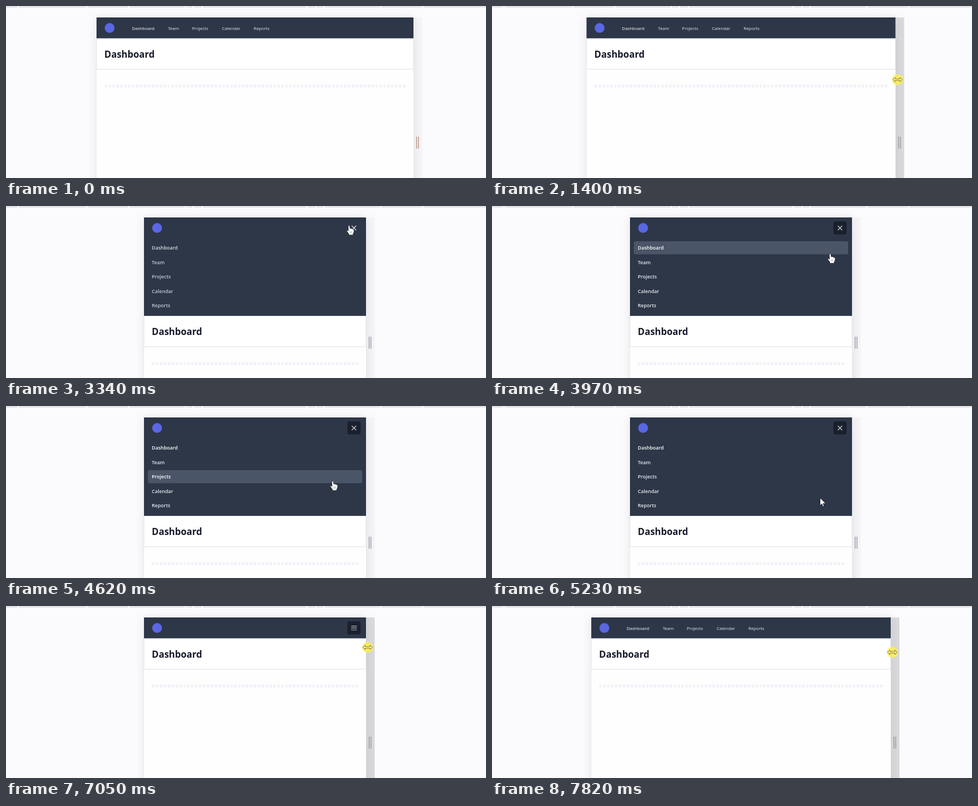
An HTML page with a canvas that plays this animation: 880 by 316 pixels, repeating every 8000 ms.

```html
<!DOCTYPE html>
<html lang="en">
<head>
<meta charset="utf-8">
<title>Responsive dashboard</title>
<style>
  html, body { margin: 0; width: 100%; height: 100%; overflow: hidden; background: #fbfbfd; }
  canvas { display: block; width: 880px; height: 316px; }
</style>
</head>
<body>
<canvas id="stage"></canvas>
<script>
const W = 880, H = 316, LOOP = 8000;
const canvas = document.getElementById('stage');
const dpr = window.devicePixelRatio || 1;
canvas.width = W * dpr;
canvas.height = H * dpr;
const c = canvas.getContext('2d');
c.scale(dpr, dpr);

const FONT = '"Open Sans", "Noto Sans", sans-serif';
const ITEMS = [['Dashboard', 65], ['Team', 131], ['Projects', 175], ['Calendar', 230], ['Reports', 288]];
const TOP_GAPS = [22, 148, 225, 329, 343, 360, 552, 568, 583, 687, 764];
const NAV_TOP = 21, NAV_H = 38.4, MENU_H = 142.5, STRIP = 16;
const ROW_TOP = 64.5, ROW_STEP = 26.5, ROW_H = 24;
const BREAKPOINT = 461;

const linear = p => p;
const smooth = p => p * p * (3 - 2 * p);
const easeOut = p => 1 - (1 - p) * (1 - p);
const lerp = (a, b, p) => a + (b - a) * p;
const within = (v, a, b) => v >= a && v < b;

// Pointer legs: start, end, number of steps, destination, easing
const LEGS = [
  [70, 840, 11, [751, 135], easeOut],
  [1310, 2110, 11, [667, 139], smooth],
  [2160, 2160, 1, [665, 139], linear],
  [2560, 2960, 6, [629, 36], smooth],
  [3570, 3970, 6, [620, 88], smooth],
  [4300, 4620, 5, [599, 138], linear],
  [4690, 5080, 6, [596, 187], easeOut],
  [5150, 5790, 9, [639, 44], smooth],
  [6570, 6880, 5, [663, 76], smooth],
  [7200, 7820, 9, [734, 85], linear]
];

// Progress in even jumps; the first jump happens at the start time
function stepped(t, a, b, n) {
  if (t < a) return 0;
  if (n === 1 || t >= b) return 1;
  return Math.min(n, Math.floor((t - a) / ((b - a) / (n - 1)) + 0.001) + 1) / n;
}

function pointerAt(t) {
  let x = 868, y = 128;
  for (const [a, b, n, to, ease] of LEGS) {
    if (t < a) break;
    const p = ease(stepped(t, a, b, n));
    x = lerp(x, to[0], p);
    y = lerp(y, to[1], p);
  }
  return { x, y };
}

function panelLeft(t) {
  if (t < 2160) return lerp(166, 250, smooth(stepped(t, 1310, 2110, 11)));
  return lerp(253, 182, stepped(t, 7200, 7820, 9));
}

function menuAlpha(t) {
  if (!within(t, 3260, 6090)) return 0;
  return t < 3340 ? 0.65 : t < 3420 ? 0.82 : 1;
}

function rect(x, y, w, h, color) {
  c.fillStyle = color;
  c.fillRect(x, y, w, h);
}

function roundRect(x, y, w, h, r, color) {
  c.beginPath();
  c.roundRect(x, y, w, h, r);
  c.fillStyle = color;
  c.fill();
}

function text(str, x, y, size, weight, color) {
  c.font = `${weight} ${size}px ${FONT}`;
  c.fillStyle = color;
  c.fillText(str, x, y);
}

function disc(x, y, r, color) {
  c.beginPath();
  c.arc(x, y, r, 0, Math.PI * 2);
  c.fillStyle = color;
  c.fill();
}

function strokeLines(lines, color, width) {
  c.beginPath();
  for (const [x1, y1, x2, y2] of lines) {
    c.moveTo(x1, y1);
    c.lineTo(x2, y2);
  }
  c.strokeStyle = color;
  c.lineWidth = width;
  c.lineCap = 'round';
  c.stroke();
}

function shape(points, fill, stroke) {
  c.beginPath();
  points.forEach(([x, y]) => c.lineTo(x, y));
  c.closePath();
  c.fillStyle = fill;
  c.fill();
  c.strokeStyle = stroke;
  c.lineWidth = 1;
  c.lineJoin = 'round';
  c.stroke();
}

function drawBackdrop() {
  rect(0, 0, W, H, '#fbfbfd');
  rect(0, 0, W, 3, '#e4e4e7');
  TOP_GAPS.forEach(x => rect(x - 1, 0, 2, 3, '#ffffff'));
}

function drawStrip(right, dark, t) {
  rect(right, NAV_TOP, STRIP, H, dark ? '#dadadd' : '#f5f5f7');
  const warm = t < 1310 || t >= 7200;
  const color = dark ? (warm ? '#a89c96' : '#a2a2a8')
    : warm ? '#bf9f90' : t < 2960 ? '#97a4ba' : '#a2a3ad';
  rect(right + 5, 240, 1.5, 22, color);
  rect(right + 8.5, 240, 1.5, 22, color);
}

function drawPanel(left, width) {
  c.save();
  c.shadowColor = 'rgba(30, 35, 60, 0.10)';
  c.shadowBlur = 18 * dpr;
  c.shadowOffsetY = 3 * dpr;
  rect(left, NAV_TOP, width, H + 40, '#ffffff');
  c.restore();
  rect(left - 0.5, NAV_TOP, 1, H, '#e3e4e8');
  rect(left + width - 0.5, NAV_TOP, 1, H, '#e3e4e8');
}

function drawContent(left, width, shift) {
  text('Dashboard', left + 14.3, 94.5 + shift, 17, 700, '#171a2b');
  rect(left, 116 + shift, width, H, '#fefefe');
  rect(left, 115.5 + shift, width, 1.2, '#e4e5e9');

  const size = 5, span = width - 29;
  const count = Math.round((span + 2.2) / 7.2);
  const pitch = (span - size) / (count - 1);
  for (let i = 0; i < count; i++) {
    rect(left + 14.5 + i * pitch, 144.7 + shift, size, 4.8, '#f1f1f8');
  }
}

function drawButton(right, open, hover) {
  if (!hover) roundRect(right - 34, 28.3, 24, 24, 3.5, '#1a202c');
  const x = right - 22, y = 40.4;
  const color = hover ? '#ffffff' : open ? '#e8ebf0' : '#b9c2cf';
  const lines = open
    ? [[x - 3.8, y - 3.8, x + 3.8, y + 3.8], [x + 3.8, y - 3.8, x - 3.8, y + 3.8]]
    : [-3.6, 0, 3.6].map(d => [x - 4.8, y + d, x + 4.8, y + d]);
  strokeLines(lines, color, 1.2);
}

function drawNav(left, width, mobile, alpha, hoverRow, hoverBtn) {
  const right = left + width, open = alpha > 0;
  rect(left, NAV_TOP, width, NAV_H + (open ? MENU_H : 0), '#2d3748');
  disc(left + 24, 40.3, 9, '#5a67e2');
  if (!mobile) {
    ITEMS.forEach(([name, dx], i) =>
      text(name, left + dx, 44, 8, 500, i ? '#e6eaf1' : '#ffffff'));
    return;
  }
  drawButton(right, open, hoverBtn);
  if (!open) return;
  if (hoverRow >= 0) {
    roundRect(left + 7, ROW_TOP + hoverRow * ROW_STEP + 0.2, width - 14, ROW_H, 3.5, '#4a5568');
  }
  c.globalAlpha = alpha;
  ITEMS.forEach(([name], i) =>
    text(name, left + 14.3, 80.2 + i * ROW_STEP, 9, 600, i && i !== hoverRow ? '#e4e8ef' : '#ffffff'));
  c.globalAlpha = 1;
}

function drawArrow() {
  shape([[0, 0], [0, 14], [3.3, 11], [5.5, 16], [7.7, 15], [5.5, 10.2], [10, 10]], '#ffffff', '#22242c');
}

function drawResize(pressed) {
  const half = [[-9, 0], [-4.5, -4], [-4.5, -1.4]];
  const top = half.concat([...half].reverse().map(([x, y]) => [-x, y]));
  const bottom = [[4.5, 1.4], [4.5, 4], [-4.5, 4], [-4.5, 1.4]];
  const points = top.concat([bottom[1], bottom[0], bottom[3], bottom[2]]);
  shape(points, pressed ? '#fff6a0' : '#ffffff', pressed ? '#80702a' : '#33343c');
}

function drawHand() {
  c.beginPath();
  c.moveTo(-1.6, 1);
  c.quadraticCurveTo(0, -1.4, 1.6, 1);
  c.lineTo(1.7, 5.2);
  c.quadraticCurveTo(3.4, 4, 4.4, 5.8);
  c.quadraticCurveTo(6, 4.8, 6.8, 6.6);
  c.quadraticCurveTo(9.2, 6, 9.2, 8.6);
  c.quadraticCurveTo(9.4, 13, 7.4, 15);
  c.lineTo(7.2, 17.2);
  c.lineTo(-0.4, 17.2);
  c.lineTo(-0.8, 15);
  c.lineTo(-4.6, 9.8);
  c.quadraticCurveTo(-4.4, 7.6, -1.6, 9.6);
  c.closePath();
  c.fillStyle = '#ffffff';
  c.fill();
  c.strokeStyle = '#20242e';
  c.lineWidth = 0.9;
  c.stroke();
  strokeLines([[2.2, 10.5, 2.2, 13.5], [4.6, 10.5, 4.6, 13.5]], '#5a606c', 0.6);
}

function drawPointer(p, kind, pressed) {
  if (pressed) disc(p.x, p.y, 10, 'rgba(252, 238, 80, 0.85)');
  c.save();
  c.translate(p.x, p.y);
  if (kind === 'resize') drawResize(pressed);
  else if (kind === 'hand') drawHand();
  else drawArrow();
  c.restore();
}

function draw(t) {
  const left = panelLeft(t), right = 913 - left, width = right - left;
  const mobile = width < BREAKPOINT;
  const alpha = mobile ? menuAlpha(t) : 0;
  const open = alpha > 0;
  const p = pointerAt(t);

  const dragging = within(t, 1160, 2560) || t >= 7050;
  const pressed = dragging || within(t, 3110, 3260) || within(t, 5940, 6090);
  const onStrip = dragging || within(p.x, right, right + STRIP);
  const hoverBtn = mobile && within(p.x, right - 34, right - 10) && within(p.y, 28, 52.5);
  const row = Math.floor((p.y - ROW_TOP) / ROW_STEP);
  const onRow = open && row >= 0 && row < ITEMS.length &&
    p.y - ROW_TOP - row * ROW_STEP <= ROW_H;
  const kind = onStrip ? 'resize' : hoverBtn || onRow ? 'hand' : 'arrow';

  drawBackdrop();
  drawStrip(right, onStrip && !within(t, 2160, 2560), t);
  drawPanel(left, width);
  drawContent(left, width, open ? MENU_H : 0);
  drawNav(left, width, mobile, alpha, onRow ? row : -1, hoverBtn);
  if (t >= 70) drawPointer(p, kind, pressed);
}

const start = performance.now();
function tick() {
  draw((performance.now() - start) % LOOP);
  requestAnimationFrame(tick);
}
tick();
</script>
</body>
</html>
```
